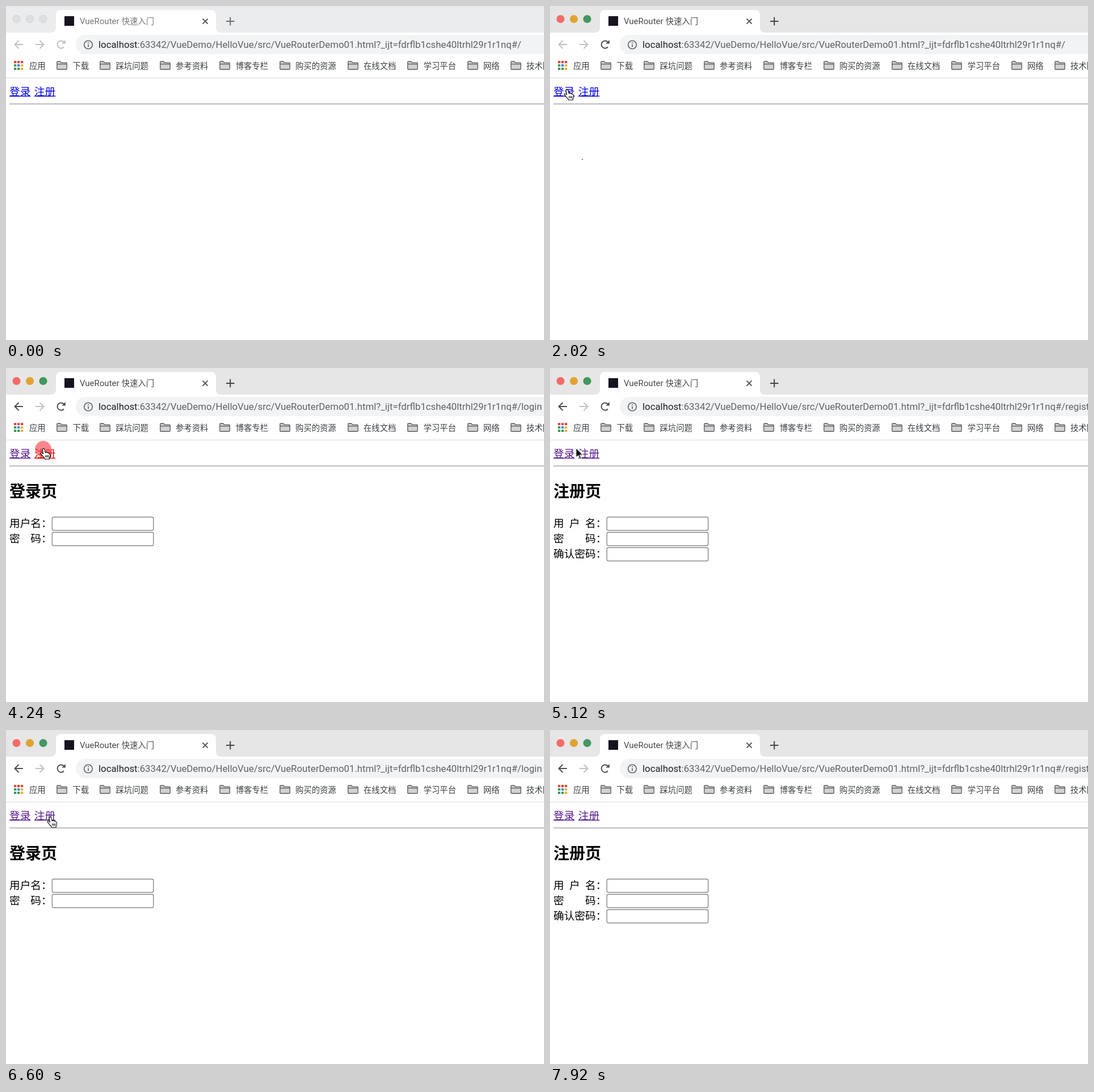
Write an HTML page that moves like this. It is 948 by 590 pixels and loops after 8 s.

```html
<!DOCTYPE html>
<html lang="zh-CN">
<head>
<meta charset="utf-8">
<title>VueRouter 快速入门</title>
<style>
html, body { margin: 0; width: 100%; height: 100%; overflow: hidden; background: #fff; }
svg { display: block; width: 948px; height: 590px; }
text { font-family: Roboto, "Noto Sans CJK SC", "Noto Sans CJK", sans-serif; white-space: pre; }
.url { font-size: 16.8px; fill: #5f6368; }
.host { fill: #202124; }
.marks { font-size: 14.35px; fill: #3c4043; }
.page { font-size: 18.7px; fill: #000; }
.title { font-size: 28px; font-weight: 700; }
.field { fill: #fff; stroke: #767676; stroke-width: 1.2; }
.line { fill: none; stroke-width: 2; }

/* 1% of the loop is 80 ms */
.blurred, .focused, .home, .login, .register, .back, .link, .hand, .arrow {
  animation: 8s step-end infinite;
}
.blurred { animation-name: blurred; }
.focused { animation-name: focused; }
.home { animation-name: home; }
.login { animation-name: login; }
.register { animation-name: register; }
.back { animation-name: back; }
.to-login { animation-name: to-login; }
.to-register { animation-name: to-register; }
.hand { animation-name: hand; }
.arrow { animation-name: arrow; }
.cursor { animation: move 8s linear infinite, seen 8s step-end infinite; }
.ripple { transform: scale(0); animation: ripple 8s linear infinite; }

@keyframes blurred { 0% { opacity: 1 } 19.5%, to { opacity: 0 } }
@keyframes focused { 0% { opacity: 0 } 19.5%, to { opacity: 1 } }
@keyframes home { 0% { opacity: 1 } 31.5%, to { opacity: 0 } }
@keyframes login { 0%, 54% { opacity: 0 } 31.5%, 72.25% { opacity: 1 } 87.5%, to { opacity: 0 } }
@keyframes register { 0%, 72.25% { opacity: 0 } 54%, 87.5%, to { opacity: 1 } }
@keyframes back { 0% { stroke: #bfc1c4 } 31.5%, to { stroke: #4b4e52 } }
@keyframes to-login {
  0% { fill: #00e }
  30.5%, 71.5% { fill: #f00 }
  31.5%, 72.25%, to { fill: #551a8b }
}
@keyframes to-register {
  0% { fill: #00e }
  51.25%, 86.25% { fill: #f00 }
  54%, 87.5%, to { fill: #551a8b }
}
@keyframes hand {
  0%, 38%, 41.2%, 63.75%, 78.3%, 91.2%, to { opacity: 0 }
  24.6%, 38.8%, 48.5%, 68.7%, 79% { opacity: 1 }
}
@keyframes arrow {
  0%, 38%, 41.2%, 63.75%, 78.3%, 91.2%, to { opacity: 1 }
  24.6%, 38.8%, 48.5%, 68.7%, 79% { opacity: 0 }
}
@keyframes seen { 0% { opacity: 0 } 4.5% { opacity: 1 } 99%, to { opacity: 0 } }
@keyframes move {
  0%, 4.5% { transform: translate(188px, 498px) }
  5.5% { transform: translate(160px, 380px) }
  7%, 8.75% { transform: translate(130px, 230px) }
  11% { transform: translate(66px, 190px) }
  13% { transform: translate(31px, 167px) }
  15% { transform: translate(44px, 250px) }
  16% { transform: translate(52px, 277px) }
  16.75%, 19.5% { transform: translate(57px, 271px) }
  22% { transform: translate(50px, 222px) }
  25.25% { transform: translate(30px, 147px) }
  27.25%, 35% { transform: translate(17px, 148px) }
  39.5%, 40.8% { transform: translate(56px, 153px) }
  42.5% { transform: translate(31px, 130px) }
  45% { transform: translate(55px, 113px) }
  47.25% { transform: translate(82px, 124px) }
  49% { transform: translate(70px, 147px) }
  49.75%, 61% { transform: translate(66px, 142px) }
  63% { transform: translate(62px, 152px) }
  65% { transform: translate(30px, 130px) }
  66.5% { transform: translate(10px, 115px) }
  68% { transform: translate(1px, 135px) }
  69.25% { transform: translate(16px, 146px) }
  70%, 76% { transform: translate(21px, 143px) }
  79% { transform: translate(50px, 150px) }
  81.25%, 81.75% { transform: translate(77px, 157px) }
  82.75%, 91% { transform: translate(78px, 152px) }
  93% { transform: translate(150px, 300px) }
  95.25%, 97.5% { transform: translate(258px, 500px) }
  99%, to { transform: translate(292px, 574px) }
}
@keyframes ripple {
  0% { transform: scale(0); opacity: .6 }
  3% { transform: scale(1); opacity: .6 }
  4.5% { opacity: .85 }
  6.75%, to { transform: scale(0); opacity: .85 }
}
</style>
</head>
<body>
<svg viewBox="0 0 948 590" xmlns="http://www.w3.org/2000/svg">
  <defs>
    <g id="folder" stroke="#55585c" stroke-width="1.3">
      <path d="M.8 13.8V2.2Q.8 1 2 1H6.7l1.8 2.2h8.5q1.2 0 1.2 1.2v9.4q0 1.2-1.2 1.2H2Q.8 15 .8 13.8z" fill="#d2d2d2"/>
      <path d="M1 5.6h17"/>
    </g>
    <path id="left" d="M16 0H1.5M8.500-7 1.5 0l7 7"/>
    <g id="reload" stroke="currentColor">
      <path d="M5 4.5A6.600 6.600 0 1 1 4.700-4.700L6-3.300"/>
      <path d="M7.800-8v6.500H1.300z" fill="currentColor" stroke="none"/>
    </g>
    <path id="plus" d="M388 27h14.500M395.200 19.800v14.500"/>
    <g id="name">
      <text x="130" y="32" font-size="15">VueRouter</text>
      <text x="203.700" y="32" font-size="14.350">快速入门</text>
    </g>
    <rect id="field" class="field" width="178.500" height="23.500" rx="2.500"/>
  </defs>

  <!-- tab strip -->
  <rect class="blurred" width="948" height="47" fill="#ebeced"/>
  <rect class="focused" width="948" height="47" fill="#e6e6e6"/>
  <path d="M79 47q9 0 9-9V16q0-9 9-9h264q9 0 9 9v22q0 9 9 9z" fill="#fff"/>
  <g class="blurred" fill="#dedfe0" stroke="#d3d4d5">
    <circle cx="18.500" cy="23" r="6.700"/><circle cx="42" cy="23" r="6.700"/><circle cx="65.500" cy="23" r="6.700"/>
  </g>
  <g class="focused">
    <circle cx="18.500" cy="23" r="7.100" fill="#f66b67"/>
    <circle cx="42" cy="23" r="7.100" fill="#e0a431"/>
    <circle cx="65.500" cy="23" r="7.100" fill="#43985f"/>
  </g>
  <rect x="103" y="18" width="17" height="17" fill="#17131f"/>
  <use class="blurred" href="#name" fill="#74777b"/>
  <use class="focused" href="#name" fill="#45484c"/>
  <g class="line">
    <path d="M346.500 22.500l9 9m0-9l-9 9" stroke="#55585c" stroke-width="1.800"/>
    <use class="blurred" href="#plus" stroke="#6a6d71"/>
    <use class="focused" href="#plus" stroke="#424548"/>
  </g>

  <!-- toolbar -->
  <g class="line">
    <use class="back" href="#left" x="14" y="68"/>
    <use href="#left" transform="translate(68 68) scale(-1 1)" stroke="#bfc1c4"/>
    <use class="blurred" href="#reload" x="97" y="68" color="#bfc1c4"/>
    <use class="focused" href="#reload" x="97" y="68" color="#4b4e52"/>
  </g>
  <rect x="123" y="51" width="860" height="34" rx="17" fill="#f1f3f4"/>
  <circle cx="145" cy="68.500" r="7.300" fill="none" stroke="#5f6368" stroke-width="1.600"/>
  <path d="M145 67.500v5M145 64v1.800" stroke="#5f6368" stroke-width="1.700"/>
  <g class="url">
    <text class="home" x="163" y="74"><tspan class="host">localhost</tspan>:63342/VueDemo/HelloVue/src/VueRouterDemo01.html?_ijt=fdrflb1cshe40ltrhl29r1r1nq#/</text>
    <text class="login" x="163" y="74"><tspan class="host">localhost</tspan>:63342/VueDemo/HelloVue/src/VueRouterDemo01.html?_ijt=fdrflb1cshe40ltrhl29r1r1nq#/login</text>
    <text class="register" x="163" y="74"><tspan class="host">localhost</tspan>:63342/VueDemo/HelloVue/src/VueRouterDemo01.html?_ijt=fdrflb1cshe40ltrhl29r1r1nq#/register</text>
  </g>

  <!-- bookmarks -->
  <g stroke-width="4.200">
    <path d="M14 99h4.300m1.700 0h4.300m1.700 0h4.300" stroke="#e2453a"/>
    <path d="M14 105h4.300M14 111h4.300m1.700 0h4.300" stroke="#3d9a58"/>
    <path d="M20 105h4.300" stroke="#4285f4"/>
    <path d="M26 105h4.300M26 111h4.300" stroke="#efb32b"/>
  </g>
  <use href="#folder" x="89" y="97"/><use href="#folder" x="165" y="97"/>
  <use href="#folder" x="271" y="97"/><use href="#folder" x="376" y="97"/>
  <use href="#folder" x="482" y="97"/><use href="#folder" x="602" y="97"/>
  <use href="#folder" x="707" y="97"/><use href="#folder" x="813" y="97"/>
  <use href="#folder" x="889" y="97"/>
  <g class="marks">
    <text x="41" y="110.500">应用</text>
    <text x="117.500" y="110.500">下载</text>
    <text x="193.500" y="110.500">踩坑问题</text>
    <text x="299" y="110.500">参考资料</text>
    <text x="404.700" y="110.500">博客专栏</text>
    <text x="510" y="110.500">购买的资源</text>
    <text x="630" y="110.500">在线文档</text>
    <text x="735.700" y="110.500">学习平台</text>
    <text x="841" y="110.500">网络</text>
    <text x="917" y="110.500">技术团</text>
  </g>
  <rect y="126.700" width="948" height="1" fill="#d9dbde"/>

  <!-- page -->
  <g class="page">
    <g class="link to-login"><text x="6" y="157.500">登录</text><rect x="6" y="158.600" width="37.400" height="1.400"/></g>
    <g class="link to-register"><text x="49.800" y="157.500">注册</text><rect x="49.800" y="158.600" width="37.400" height="1.400"/></g>
    <rect x="6" y="172.200" width="942" height="1.400" fill="#a2a2a2"/>
    <rect x="6" y="173.600" width="942" height=".8" fill="#d6d6d6"/>
    <g class="login">
      <text class="title" x="6" y="228">登录页</text>
      <text x="6" y="280.500">用户名：</text>
      <text x="6" y="307.500">密　码：</text>
      <use href="#field" x="81.300" y="263.300"/>
      <use href="#field" x="81.300" y="290.300"/>
    </g>
    <g class="register">
      <text class="title" x="6" y="228">注册页</text>
      <text y="280.500"><tspan x="6">用</tspan><tspan x="34">户</tspan><tspan x="62">名：</tspan></text>
      <text y="307.500"><tspan x="6">密</tspan><tspan x="62">码：</tspan></text>
      <text x="6" y="334.500">确认密码：</text>
      <use href="#field" x="100.200" y="263.300"/>
      <use href="#field" x="100.200" y="290.300"/>
      <use href="#field" x="100.200" y="317.300"/>
    </g>
  </g>

  <!-- clicks -->
  <g fill="#f5373f">
    <g transform="translate(57 271)"><circle class="ripple" r="17" style="animation-delay:1.5s"/></g>
    <g transform="translate(17 148)"><circle class="ripple" r="17" style="animation-delay:2.36s"/></g>
    <g transform="translate(65.500 143)"><circle class="ripple" r="17" style="animation-delay:4.04s"/></g>
    <g transform="translate(21 143)"><circle class="ripple" r="17" style="animation-delay:5.7s"/></g>
    <g transform="translate(78 152)"><circle class="ripple" r="17" style="animation-delay:6.86s"/></g>
  </g>

  <g class="cursor">
    <path class="arrow" d="M0 0V17.500l4-3.800 2.700 6.500 2.700-1.100-2.700-6.300h5.500z" fill="#000" stroke="#fff" stroke-width="1.200"/>
    <g class="hand" stroke="#000" stroke-width="1.100" stroke-linejoin="round">
      <path d="M-1.800 1.800Q-1.500 .2 .2 .4 1.600 .5 2 2L3.200 7.500Q4.200 6.300 5.500 7.200 7.200 6.600 8.100 8.200 9.800 7.800 10.400 9.400 11.700 9.700 11.700 11.500L11.500 14.500 10.300 17v2H2.600L2 17.200Q-1 14.800-2 12.500L-4.600 9.800Q-5.300 8.300-4 7.700-2.400 7.500-.4 9.500z" fill="#fff"/>
      <path d="M4 12v4M6.300 12v4M8.600 12v4" fill="none"/>
    </g>
  </g>
</svg>
</body>
</html>
```
